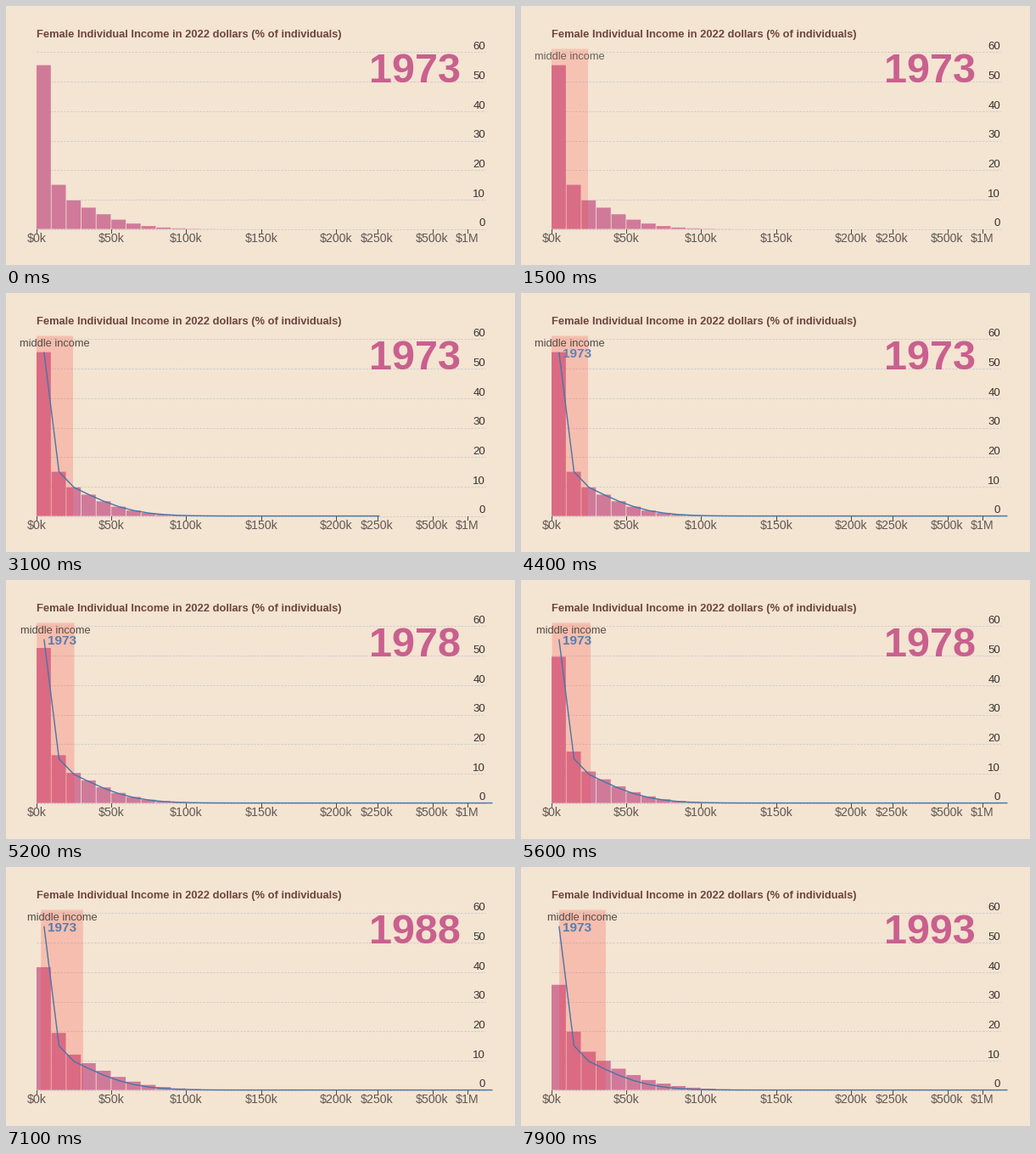
A matplotlib script that plays this animation: 600 px wide and 305 px high, repeating every 8000 ms.

```python
import numpy as np
import matplotlib.pyplot as plt
from matplotlib.animation import FuncAnimation
from matplotlib.patches import Rectangle

W, H, DPI = 600, 305, 100
STEP, FRAMES = 100, 80
PT = 72 / DPI
X0, Y0, BIN, UNIT = 36, 262.6, 17.65, 3.47
BINS = 20

BG, PINK, BLUE = "#f4e4d2", "#c9608e", "#4676a8"
RACE_START, YEAR_MS, MOVE_MS = 4900, 800, 600


def ease(t, start, length):
    u = min(max((t - start) / length, 0), 1)
    return 4 * u ** 3 if u < 0.5 else 1 - 4 * (1 - u) ** 3


def mix(a, b, p):
    return a + (b - a) * p


def px(k):
    return X0 + k * BIN / 10


def py(share):
    return Y0 - share * UNIT


def progress(u):
    """Share of the whole change reached at u, with a slower middle."""
    return u + 0.05 * np.sin(2 * np.pi * u)


def shares(u):
    """Percent per $10k bin: two low-income bins, then a Gaussian tail."""
    p = progress(u)
    j = np.arange(BINS - 2)
    tail = mix(9.7, 13, p) * np.exp(-0.25 * j - mix(0.041, 0.0215, p) * j ** 2)
    return np.append([mix(55.6, 35.7, p), 15 + 4.8 * p * (2 - p)], tail)


def middle_range(u):
    """Middle income limits in $k."""
    return np.array([5.2 * u ** 2, 24.4 + 11.8 * progress(u) ** 1.6])


fig = plt.figure(figsize=(W / DPI, H / DPI), dpi=DPI, facecolor=BG)
ax = fig.add_axes([0, 0, 1, 1])
ax.set_xlim(0, W)
ax.set_ylim(H, 0)
ax.axis("off")


def label(x, y, s, size, color, ha="left", weight="normal"):
    return ax.text(x, y, s, fontsize=size * PT, color=color, ha=ha, va="baseline",
                   weight=weight, family="Liberation Sans", zorder=6)


def stroke(xs, ys, color, width=1, **kw):
    return ax.plot(xs, ys, color=color, lw=width * PT, **kw)[0]


def block(x, y, w, h, color, z):
    return ax.add_patch(Rectangle((x, y), w, h, fc=color, lw=0, zorder=z, snap=False))


label(X0, 37.5, "Female Individual Income in 2022 dollars (% of individuals)",
      12.95, "#6c453c", weight="bold")

for v in range(0, 70, 10):
    y = py(v)
    stroke([X0, 565], [y, y], "#c6cace", ls=(0, (2, 2)), zorder=1)
    label(565, y - 3.2, str(v), 13.3, "#38332f", "right")

ticks = [(px(k), f"${k}k") for k in range(0, 201, 50)]
for x, s in ticks + [(437.5, "$250k"), (502.5, "$500k"), (543.5, "$1M")]:
    stroke([x, x], [263, 267], "#4d4742", zorder=1)
    label(x, 278, s, 14.1, "#5f5853", "center")

bars = [block(X0 + i * BIN, Y0, BIN - 0.8, 0, "#d07a9a", 2) for i in range(BINS)]
band = block(X0, 50.5, 1, Y0 - 50.5, "#ff3732", 3)
curve = stroke([], [], BLUE, 1.4, zorder=4, solid_capstyle="butt",
               solid_joinstyle="round")
year = label(536, 89.6, "", 48.6, PINK, "right", "bold")
first = label(48.7, 76.3, "1973", 15.4, "#557eb0", weight="bold")
middle = label(0, 63, "middle income", 12.9, "#554c47", "center")

# Outline of the first year, drawn by arc length
cx = np.append(X0 + BIN * (np.arange(BINS) + 0.5), 573.5)
cy = py(np.append(shares(0), 0))
arc = np.append(0, np.cumsum(np.hypot(np.diff(cx), np.diff(cy))))


def trace(part):
    end = part * arc[-1]
    n = np.searchsorted(arc, end)
    curve.set_data(np.append(cx[:n], np.interp(end, arc, cx)),
                   np.append(cy[:n], np.interp(end, arc, cy)))
    curve.set_visible(part > 0)


def draw(frame):
    t = frame * STEP
    step = max(0, (t - RACE_START) // YEAR_MS + 1)
    prev = max(step - 1, 0)
    e = ease(t, RACE_START + prev * YEAR_MS, MOVE_MS)
    u0, u1 = prev / 4, step / 4

    for bar, s in zip(bars, mix(shares(u0), shares(u1), e)):
        bar.set_y(py(s))
        bar.set_height(s * UNIT)
    lo, hi = px(mix(middle_range(u0), middle_range(u1), e))
    band.set_x(lo)
    band.set_width(hi - lo)
    middle.set_x((lo + hi) / 2)
    year.set_text(str(1973 + 5 * step))

    shown = ease(t, 900, 900)
    band.set_alpha(0.22 * shown)
    middle.set_alpha(shown)
    trace(ease(t, 1900, 1900))
    first.set_alpha(ease(t, 3800, 800))
    return [*bars, band, curve, year, first, middle]


anim = FuncAnimation(fig, draw, frames=FRAMES, interval=STEP, repeat=True,
                     repeat_delay=0)
plt.show()
```
